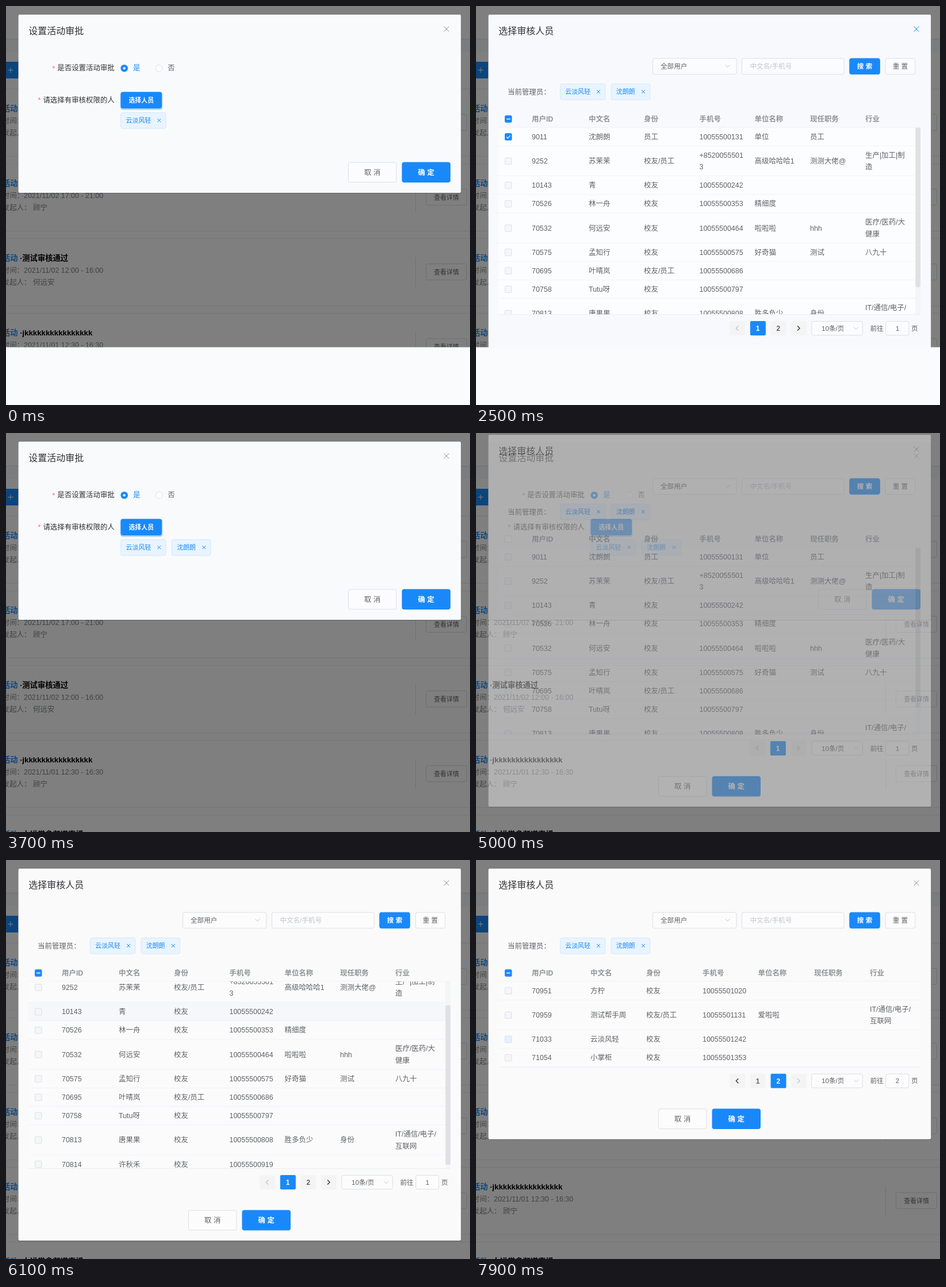
An HTML page that plays this animation: 807 px wide and 694 px high, repeating every 8000 ms.

```html
<!DOCTYPE html>
<html lang="zh-CN">
<head>
<meta charset="utf-8">
<title>设置活动审批</title>
<style>
html, body { margin: 0; width: 100%; height: 100%; overflow: hidden; background: #f9fbfd; }
svg { display: block; }
text { font-family: 'Liberation Sans', 'Noto Sans CJK SC', 'Noto Sans CJK', sans-serif; white-space: pre; }
</style>
</head>
<body>
<svg id="stage" width="807" height="694" viewBox="0 0 807 694"></svg>
<script>
const LOOP = 8000, STEP = 100;
const BLUE = '#1989fa', INK = '#606266', DARK = '#303133', GREY = '#909399', LINE = '#dcdfe6', HAIR = '#ebeef5';
const BODY_TOP = 211.5, SINGLE = 32.1, DOUBLE = 52.4, VIEW = 325;
const ADMINS = ['云淡风轻', '沈朗朗'];
const HEADS = ['用户ID', '中文名', '身份', '手机号', '单位名称', '现任职务', '行业'];
const WIDE = [97, 199, 296, 394, 490.5, 588, 685];
const NARROW = [97, 196, 292, 388.5, 484.5, 581, 677];

// Columns split by commas, line breaks marked with ~
const parse = s => s.trim().split('\n').map(row => row.split(','));
const PAGE1 = parse(`
9011,沈朗朗,员工,10055500131,单位,员工,
9252,苏茉茉,校友/员工,+8520055501~3,高级哈哈哈1,测测大佬@,生产|加工|制~造
10143,青,校友,10055500242,,,
70526,林一舟,校友,10055500353,精细度,,
70532,何远安,校友,10055500464,啦啦啦,hhh,医疗/医药/大~健康
70575,孟知行,校友,10055500575,好奇猫,测试,八九十
70695,叶晴岚,校友/员工,10055500686,,,
70758,Tutu呀,校友,10055500797,,,
70813,唐果果,校友,10055500808,胜多负少,身份,IT/通信/电子/~互联网
70814,许秋禾,校友,10055500919,,,`);
const PAGE2 = parse(`
70951,方柠,校友,10055501020,,,
70959,测试帮手周,校友/员工,10055501131,爱啦啦,,IT/通信/电子/~互联网
71033,云淡风轻,校友,10055501242,,,
71054,小掌柜,校友,10055501353,,,`);

const clamp = v => Math.min(1, Math.max(0, v));

// cubic-bezier(.25, .1, .25, 1)
function ease(v) {
  const x = clamp(v);
  let lo = 0, hi = 1, u = x;
  for (let i = 0; i < 24; i++) {
    u = (lo + hi) / 2;
    const bx = .75 * u * (1 - u) ** 2 + .75 * u * u * (1 - u) + u ** 3;
    if (bx < x) lo = u; else hi = u;
  }
  return .3 * u * (1 - u) ** 2 + 3 * u * u * (1 - u) + u ** 3;
}

// Drawing helpers; y is the vertical centre of a text
const rect = (x, y, w, h, fill, stroke = 'none', r = 0, more = '') =>
  `<rect x="${x}" y="${y}" width="${w}" height="${h}" rx="${r}" fill="${fill}" stroke="${stroke}" ${more}/>`;
const text = (x, y, s, fill = INK, size = 12.45, bold = false, anchor = 'start') =>
  `<text x="${x}" y="${y + size * .37}" fill="${fill}" font-size="${size}" font-weight="${bold ? 700 : 400}" text-anchor="${anchor}">${s}</text>`;
const path = (d, stroke, width = 1) => `<path d="${d}" fill="none" stroke="${stroke}" stroke-width="${width}"/>`;
const hline = (x, y, w, color) => rect(x, y, w, 1, color);
const cross = (x, y, r, color) =>
  path(`M${x - r} ${y - r}l${2 * r} ${2 * r}M${x + r} ${y - r}l${-2 * r} ${2 * r}`, color);
const chevron = (x, y) => path(`M${x - 4} ${y - 2}l4 4l4 -4`, '#c0c4cc');
const arrow = (x, y, dir, color) => path(`M${x - 2 * dir} ${y - 4}l${4 * dir} 4l${-4 * dir} 4`, color, 1.3);
const group = (s, more) => `<g ${more}>${s}</g>`;

function button(x, y, w, h, label, primary, size = 12.45) {
  return rect(x + .5, y + .5, w - 1, h - 1, primary ? BLUE : '#fff', primary ? BLUE : LINE, 3, primary ? '' : 'fill-opacity=".4"') +
    text(x + w / 2, y + h / 2, label, primary ? '#fff' : INK, size, primary, 'middle');
}

function field(x, y, w, h) {
  return rect(x + .5, y + .5, w - 1, h - 1, '#fff', LINE, 3, 'fill-opacity=".4"');
}

function tag(x, y, name, hover) {
  const w = 36.5 + name.length * 10.7, cx = x + w - 12.3, cy = y + 14;
  return rect(x + .5, y + .5, w - 1, 27.5, '#e8f4ff', '#d1e9ff', 3) + text(x + 9.3, cy, name, BLUE, 10.9) +
    (hover ? `<circle cx="${cx}" cy="${cy}" r="7" fill="${BLUE}"/>` : '') +
    cross(cx, cy, 3, hover ? '#fff' : BLUE);
}

function checkbox(y, state, fill = '#f4f6fa') {
  const on = state === 'on' || state === 'some';
  return rect(50.5, y - 5.5, 11.5, 11.5, on ? BLUE : fill, on ? BLUE : LINE, 1.5) +
    (state === 'on' ? path(`M53 ${y + .5}l2.3 2.3l4.2 -5`, '#fff', 1.2) : '') +
    (state === 'some' ? rect(53, y - .5, 6.5, 1.5, '#fff') : '');
}

function frame(bottom, fill, title, hover) {
  return rect(21, 15, 771, bottom - 14, '#000', 'none', 2, 'opacity=".25"') +
    rect(21.5, 15, 769.8, bottom - 15, fill, 'none', 2) +
    text(39.3, 43, title, DARK, 16) + cross(766, 40, 4.5, hover ? BLUE : GREY);
}

const footer = (x, y) => button(x, y, 84.5, 35.5, '取 消') + button(x + 93.5, y, 84.5, 35.5, '确 定', true);

function card(y, title, time, person) {
  return hline(0, y, 807, '#eceef2') + hline(0, y + 117, 807, '#eceef2') +
    text(-6, y + 34, '活动', '#1890ff', 13.3, true) + text(24.3, y + 34, '·', '#000', 13.3, true) +
    text(28.3, y + 34, title, '#000', 13.3, true) +
    text(-6.3, y + 55.5, '时间：' + time, '#80848a') +
    text(-6.3, y + 76.5, '发起人：', '#80848a') + text(47, y + 76.5, person, '#80848a') +
    rect(712, y + 33, 1, 52, '#dfe2e8') + button(730, y + 44, 72, 29, '查看详情', false, 10.9);
}

function page(height) {
  return rect(0, 0, 807, height, '#fff') + rect(0, 58, 807, 22, '#f8f9fb') + hline(0, 57, 807, '#e2e4e8') +
    rect(-20, 97, 60, 29, BLUE) + path('M3.5 111.5h9M8 107v9', '#fff') +
    card(144, '校友交流', '2021/11/03 12:00 - 16:00', '顾宁') +
    card(274, '校友交流', '2021/11/02 17:00 - 21:00', '顾宁') +
    card(404, '测试审核通过', '2021/11/02 12:00 - 16:00', '何远安') +
    card(534, 'jkkkkkkkkkkkkkkkk', '2021/11/01 12:30 - 16:30', '顾宁') +
    card(664, '大讲堂多频道直播', '', '') +
    rect(0, 0, 807, height, '#000', 'none', 0, 'opacity=".5"');
}

function settings(s) {
  const glow = s.glow
    ? rect(199, 149.5, 73, 30.5, BLUE, 'none', 4, 'opacity=".25"') + rect(198.5, 149, 74, 32, BLUE, 'none', 5, 'opacity=".18"') : '';
  return frame(325, '#f9fafc', '设置活动审批') +
    text(80.5, 108, '*', '#f56c6c') + text(89.3, 107.5, '是否设置活动审批', DARK) +
    `<circle cx="205.7" cy="108.3" r="6.3" fill="${BLUE}"/><circle cx="205.7" cy="108.3" r="2.1" fill="#fff"/>` +
    text(221, 107.5, '是', BLUE) +
    `<circle cx="266.3" cy="108.3" r="5.8" fill="#fff" stroke="${LINE}"/>` + text(281.3, 107.5, '否') +
    text(55.5, 163.5, '*', '#f56c6c') + text(64.4, 163, '请选择有审核权限的人', DARK) +
    glow + button(199.5, 149.5, 71.5, 28.5, '选择人员', true, 10.9) +
    tag(199.3, 185, ADMINS[0], s.tagHover) + (s.picked ? tag(288, 185, ADMINS[1]) : '') +
    footer(595, 271.5) +
    (s.dim ? rect(21.5, 15, 769.8, 310, '#000', 'none', 2, 'opacity=".5"') : '');
}

function tableRows(s, cols) {
  const width = s.page === 1 ? 725 : 734;
  let y = BODY_TOP - s.scroll;
  return s.rows.map((row, i) => {
    const h = row.some(cell => cell.includes('~')) ? DOUBLE : SINGLE, mid = y + h / 2 - .3;
    const cells = row.map((cell, c) => {
      const lines = cell.split('~');
      return lines.map((line, n) => text(cols[c], mid + (n - (lines.length - 1) / 2) * 20.5, line)).join('');
    }).join('');
    const checked = s.checked && s.page === 1 && i === 0;
    const pending = s.page === 2 && i === 2;
    const out = rect(39, y, width, h, i === s.hoverRow ? '#f5f7fa' : s.rowFill) + hline(39, y + h - .6, width, HAIR) +
      checkbox(mid, checked && 'on', pending ? '#e6f1fd' : undefined) + cells;
    y += h;
    return out;
  }).join('');
}

function pager(s, y) {
  const top = y - 12.5, current = s.current;
  const box = (x, fill) => rect(x, top, 27, 25, fill, 'none', 2);
  let x = s.pages === 1 ? 476.3 : 441.3;
  let out = box(x, '#f4f4f5') + arrow(x + 13, y, -1, current > 1 ? DARK : '#c0c4cc');
  for (let n = 1; n <= s.pages; n++) {
    x += 35.6;
    const active = n === current;
    out += box(x, active ? BLUE : '#f4f4f5') +
      text(x + 13.3, y, n, active ? '#fff' : n === 2 && s.pageHover ? BLUE : INK, 12, true, 'middle');
  }
  x += 35.6;
  out += box(x, '#f4f4f5') + arrow(x + 13, y, 1, current < s.pages ? DARK : '#c0c4cc');
  return out + field(583.3, top, 89.5, 25) + text(601, y, '10条/页', INK, 11.6) + chevron(661, y) +
    text(685.5, y, '前往', INK, 11.6) + field(712.3, top, 41, 25) +
    text(733, y, s.typedPage, INK, 11.6, false, 'middle') + text(757, y, '页', INK, 11.6);
}

function picker(s) {
  const count = s.rows.length, scrolls = count === 10;
  const end = BODY_TOP + (scrolls ? VIEW : count ? 3 * SINGLE + DOUBLE : 53);
  const cols = scrolls ? NARROW : WIDE;
  let body = text(406, 238.5, '暂无数据', GREY, 12.45, false, 'middle');
  if (count) {
    body = `<svg x="0" y="${BODY_TOP}" width="807" height="${end - BODY_TOP}" viewBox="0 ${BODY_TOP} 807 ${end - BODY_TOP}">` +
      tableRows(s, cols) +
      (scrolls ? rect(764, BODY_TOP, 9.3, VIEW, '#f4f5f7') + rect(764.3, BODY_TOP + s.scroll * .853, 8.7, 277.5, '#e0e1e4', 'none', 3) : '') + '</svg>';
  }
  return frame(end + 125.5, s.fill, '选择审核人员', s.closeHover) +
    field(307, 90.7, 146.5, 28.5) + text(321, 104.5, '全部用户', INK, 11.6) + chevron(437.5, 104.5) +
    field(462, 90.7, 178.5, 28.5) + text(476.5, 104.5, '中文名/手机号', '#c0c4cc', 11.6) +
    button(649.3, 90.7, 53.5, 28.5, '搜 索', true, 11.6) + button(711.7, 90.7, 52.5, 28.5, '重 置', false, 11.6) +
    text(55, 149.5, '当前管理员：') + tag(146, 135, ADMINS[0]) +
    group(tag(234.5, 135, ADMINS[1]), `opacity="${s.tagFade}"`) +
    checkbox(196.3, s.checked && 'some', count ? '#fff' : '#e8eefa') +
    HEADS.map((head, i) => text(cols[i], 196, head, GREY, 12.45, true)).join('') +
    hline(39, 210.7, 734, HAIR) + body + hline(39, end - .5, 734, HAIR) +
    pager(s, end + 24) + footer(317, end + 72.3);
}

function stateAt(t) {
  const again = t >= 4900, leaving = t >= 2800 && t < 3000;
  const secondPage = t >= 7800, loaded = again ? t >= 5300 : t >= 500;
  let shown = 0;
  if (again) shown = ease((t - 4925) / 300);
  else if (leaving) shown = 1 - ease((t - 2750) / 300);
  else if (t >= 300 && t < 2800) shown = ease((t - 175) / 300);
  return {
    shown,
    dim: again || (t >= 300 && t < 2800),
    height: t < 3200 ? 593.5 : 694,
    glow: t < 3000 || (t >= 3700 && t < 4300) || t >= 4700,
    tagHover: t >= 4400 && t < 4600,
    picked: t >= 1100,
    tagFade: t < 1100 ? 0 : t < 1200 ? .5 : 1,
    checked: again ? loaded : t >= 1100,
    closeHover: t >= 2500 && t < 3000,
    rows: secondPage ? PAGE2 : loaded || again ? PAGE1 : [],
    page: secondPage ? 2 : 1,
    pages: loaded ? 2 : 1,
    current: t >= 7400 ? 2 : 1,
    typedPage: t >= 7500 ? 2 : 1,
    pageHover: t >= 7200,
    scroll: secondPage ? 0 : 48 * ease((t - 5850) / 240) + 9 * ease((t - 6250) / 240),
    hoverRow: t >= 5900 && t < 6300 ? 2 : -1,
    fill: again ? '#fafafa' : loaded ? '#f8f9fc' : '#fdfdfd',
    rowFill: again ? '#fbfbfc' : '#fcfdfe'
  };
}

const stage = document.getElementById('stage');
const start = performance.now();
let drawn = -1;

function update() {
  const t = Math.floor((performance.now() - start) % LOOP / STEP) * STEP;
  if (t !== drawn) {
    drawn = t;
    const s = stateAt(t);
    const lift = Math.round(-20 * (1 - s.shown));
    stage.innerHTML = page(694) + settings(s) +
      (s.shown ? group(picker(s), `opacity="${s.shown}" transform="translate(0 ${lift})"`) : '') +
      rect(0, s.height, 807, 694 - s.height, '#f9fbfd');
  }
  requestAnimationFrame(update);
}
update();
</script>
</body>
</html>
```
